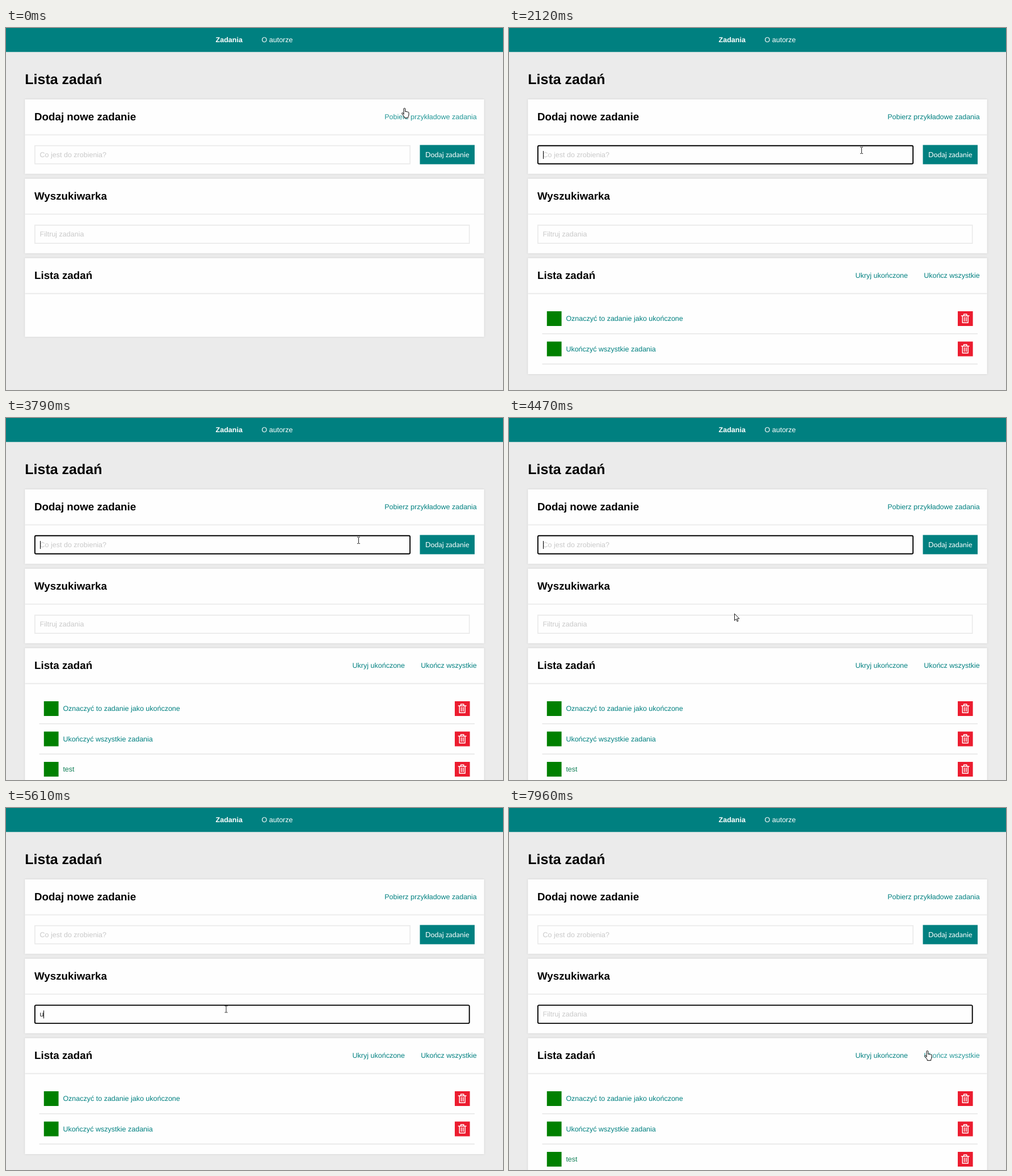
Recreate the animation shown at these times as an HTML page. Size 876 by 639 pixels, loop 8000 ms.

```html
<!DOCTYPE html>
<html lang="pl">
<head>
<meta charset="utf-8">
<title>Lista zadań</title>
<style>
html, body { margin: 0; width: 100%; height: 100%; overflow: hidden; background: #ebebeb; }
svg { display: block; }
text { font: 12.5px "Liberation Sans", Arial, sans-serif; text-rendering: geometricPrecision; white-space: pre; }
.bold { font-weight: bold; }
.h1 { font-size: 25px; font-weight: bold; }
.h2 { font-size: 18.75px; font-weight: bold; }
.lato { font-family: Lato, sans-serif; }
.card { fill: #fefefe; filter: drop-shadow(0 0 1.7px #ccc); }
</style>
</head>
<body>
<svg id="stage" width="876" height="639" viewBox="0 0 876 639"></svg>
<script>
const LOOP = 8000;
const TEAL = '#008080', HOVER = '#229797', PALE = '#c9c9c9', LINE = '#ebebeb';
const stage = document.getElementById('stage');

function add(tag, attrs, parent = stage) {
  const el = document.createElementNS('http://www.w3.org/2000/svg', tag);
  set(el, attrs);
  parent.appendChild(el);
  return el;
}
function set(el, attrs) {
  for (const key in attrs) el.setAttribute(key, attrs[key]);
}
function show(el, on) {
  el.setAttribute('visibility', on ? 'visible' : 'hidden');
}
function rect(x, y, width, height, fill, parent) {
  return add('rect', { x, y, width, height, fill }, parent);
}
function label(x, y, str, attrs, parent) {
  const el = add('text', { x, y, ...attrs }, parent);
  el.textContent = str;
  return el;
}

// Page
rect(0, 0, 876, 639, LINE);
rect(0, 0, 876, 42.3, TEAL);
label(369.6, 25, 'Zadania', { class: 'bold', fill: '#fff' });
label(450.6, 25, 'O autorze', { fill: '#fff' });
label(33.3, 98.5, 'Lista zadań', { class: 'h1' });

function card(y, height, title) {
  const box = add('rect', { class: 'card', x: 33.3, y, width: 809.4, height });
  rect(33.3, y + 61.6, 809.4, 1.9, LINE);
  label(50, y + 37.2, title, { class: 'h2' });
  return box;
}
card(126, 131.5, 'Dodaj nowe zadanie');
card(266, 131.7, 'Wyszukiwarka');
const listCard = card(406.2, 139, 'Lista zadań');

function link(x, y, str) {
  return label(x, y, str, { 'text-anchor': 'end', fill: TEAL });
}
const fetchLink = link(829.8, 161, 'Pobierz przykładowe zadania');
const loading = label(746, 161, 'Ładowanie...', { fill: PALE });
const hideLink = link(703, 441, 'Ukryj ukończone');
const finishLink = link(829.8, 441, 'Ukończ wszystkie');

rect(729.5, 206.5, 96.5, 34, TEAL);
label(777.8, 227.8, 'Dodaj zadanie', { class: 'lato', fill: '#fff', 'text-anchor': 'middle' });

function field(y, width, hint) {
  const box = add('rect', { x: 50.9, y: y + 0.9, width: width - 1.8, height: 32, fill: '#fefefe' });
  const text = label(59.6, y + 21.2, '', {});
  const caret = rect(60, y + 10.2, 1, 14, '#000');
  return (value, focused, caretOn) => {
    set(box, {
      stroke: focused ? '#000' : '#e9e9e9',
      'stroke-width': focused ? 1.9 : 1.6,
      rx: focused ? 2 : 0
    });
    text.textContent = value || hint;
    text.setAttribute('fill', value ? '#222' : PALE);
    caret.setAttribute('x', value ? Math.floor(59.9 + text.getComputedTextLength()) : 60);
    show(caret, focused && caretOn);
  };
}
const taskField = field(206.8, 663, 'Co jest do zrobienia?');
const searchField = field(347.2, 767.6, 'Filtruj zadania');

// Tasks
const TRASH = 'M6.4 8H20 M10.6 8V5.3H15.8V8 M8.3 8V20.2H18.1V8 M11.6 10.8V17.6 M14.8 10.8V17.6';
const rows = ['Oznaczyć to zadanie jako ukończone', 'Ukończyć wszystkie zadania', 'test'].map((name, i) => {
  const row = add('g', { transform: `translate(0 ${500 + i * 53.5})` });
  rect(66.8, 0, 25.8, 26, '#008000', row);
  label(100.4, 17, name, { fill: i === 2 ? '#128058' : TEAL }, row);
  rect(791, 0, 26.6, 26, '#ec1c2f', row);
  add('path', {
    d: TRASH, transform: 'translate(791 0)', fill: 'none', stroke: '#fff',
    'stroke-width': 1.5, 'stroke-linejoin': 'round', 'stroke-linecap': 'round'
  }, row);
  rect(58.5, 39, 767.5, 1.4, '#e4e4e4', row);
  return row;
});

// Pointers, each drawn around its hot spot
function pointer(d, attrs) {
  return add('path', { d, fill: '#fff', stroke: '#000', 'stroke-width': 1, 'stroke-linejoin': 'round', ...attrs });
}
const pointers = {
  hand: pointer('M-1.4 11.5V1.9a1.4 1.4 0 0 1 2.8 0V6.6q1.3-.9 2.3.3 1.2-.7 2.2.5 1.6-.5 1.7 1.2V12q0 2-1.3 3.8V17.7H-.2V16L-4.4 10.6Q-5.4 8.9-3.8 8.6-2.7 8.7-1.4 11Z'),
  arrow: pointer('M.5.5V12.5L3.3 9.9 5.2 14.2 7 13.4 5.1 9.2H8.9Z', { 'stroke-width': 0.9 }),
  beam: pointer('M-2.5-5.6H-.7L0-5 .7-5.6H2.5M0-5V5M-2.5 5.6H-.7L0 5 .7 5.6H2.5', { fill: 'none', stroke: '#222' })
};

// Pointer keys: time, x, y; each is held until the next
const keys = [[0, 702.4, 141], [130, 701.5, 153], [200, 700.6, 165], [730, 700.6, 162]];
function move(start, step, count, p0, p1, p2, p3) {
  for (let i = 1; i <= count; i++) {
    const u = i / count, v = 1 - u;
    const at = k => v * v * v * p0[k] + 3 * v * v * u * p1[k] + 3 * v * u * u * p2[k] + u * u * u * p3[k];
    keys.push([start + (i - 1) * step, at(0), at(1)]);
  }
}
move(1260, 65, 5, [700.6, 162], [685, 180], [635, 210], [621.5, 216]);
move(3860, 67.7, 10, [621.5, 216], [610, 225], [425, 325], [397, 345]);
keys.push([4540, 392, 352], [4600, 390, 353.5], [4670, 388.5, 355], [4740, 388, 355.3]);
move(7470, 70, 8, [388, 355.3], [500, 480], [700, 546], [737.4, 428]);

function inside(x, y, x0, y0, x1, y1) {
  return x >= x0 && x <= x1 && y >= y0 && y <= y1;
}

// Typing: time, value
const taskTyping = [[0, ''], [2800, 't'], [3000, 'te'], [3130, 'tes'], [3330, 'test'], [3790, '']];
const searchTyping = [[0, ''], [5610, 'u'], [5680, 'uk'], [5940, 'uko'], [6540, 'uk'], [6810, 'u'], [6940, '']];
const caretTimes = [[1920, 2450], [2800, 3860], [4400, 4940], [5070, 6940], [7070, 7470]];

function last(list, t) {
  let found = list[0];
  for (const item of list) if (item[0] <= t) found = item;
  return found;
}

function draw(t) {
  const busy = t >= 1000 && t < 2050;
  const loaded = t >= 2050;
  const query = last(searchTyping, t)[1];
  const added = t >= 3790;
  const count = !loaded ? 0 : added && !query ? 3 : 2;
  const caretOn = caretTimes.some(([a, b]) => t >= a && t < b);

  taskField(last(taskTyping, t)[1], t >= 1920 && t < 5070, caretOn);
  searchField(query, t >= 5070, caretOn);

  listCard.setAttribute('height', count ? 97.6 + count * 53.6 : 139);
  rows.forEach((row, i) => show(row, i < count));
  show(fetchLink, !busy);
  show(loading, busy);
  show(hideLink, loaded);
  show(finishLink, loaded);

  const [, x, y] = last(keys, t);
  const onFetch = !busy && inside(x, y, 660, 140, 835, 180);
  const onFinish = loaded && inside(x, y, 724, 424, 835, 450);
  const onField = inside(x, y, 50, 206, 713, 241) || inside(x, y, 50, 347, 818, 381);
  fetchLink.setAttribute('fill', onFetch ? HOVER : TEAL);
  finishLink.setAttribute('fill', onFinish ? HOVER : TEAL);
  const kind = onFetch || onFinish ? 'hand' : onField ? 'beam' : 'arrow';
  for (const name in pointers) show(pointers[name], name === kind);
  pointers[kind].setAttribute('transform', `translate(${x} ${y})`);
}

function tick() {
  draw(performance.now() % LOOP);
  requestAnimationFrame(tick);
}
tick();
</script>
</body>
</html>
```
